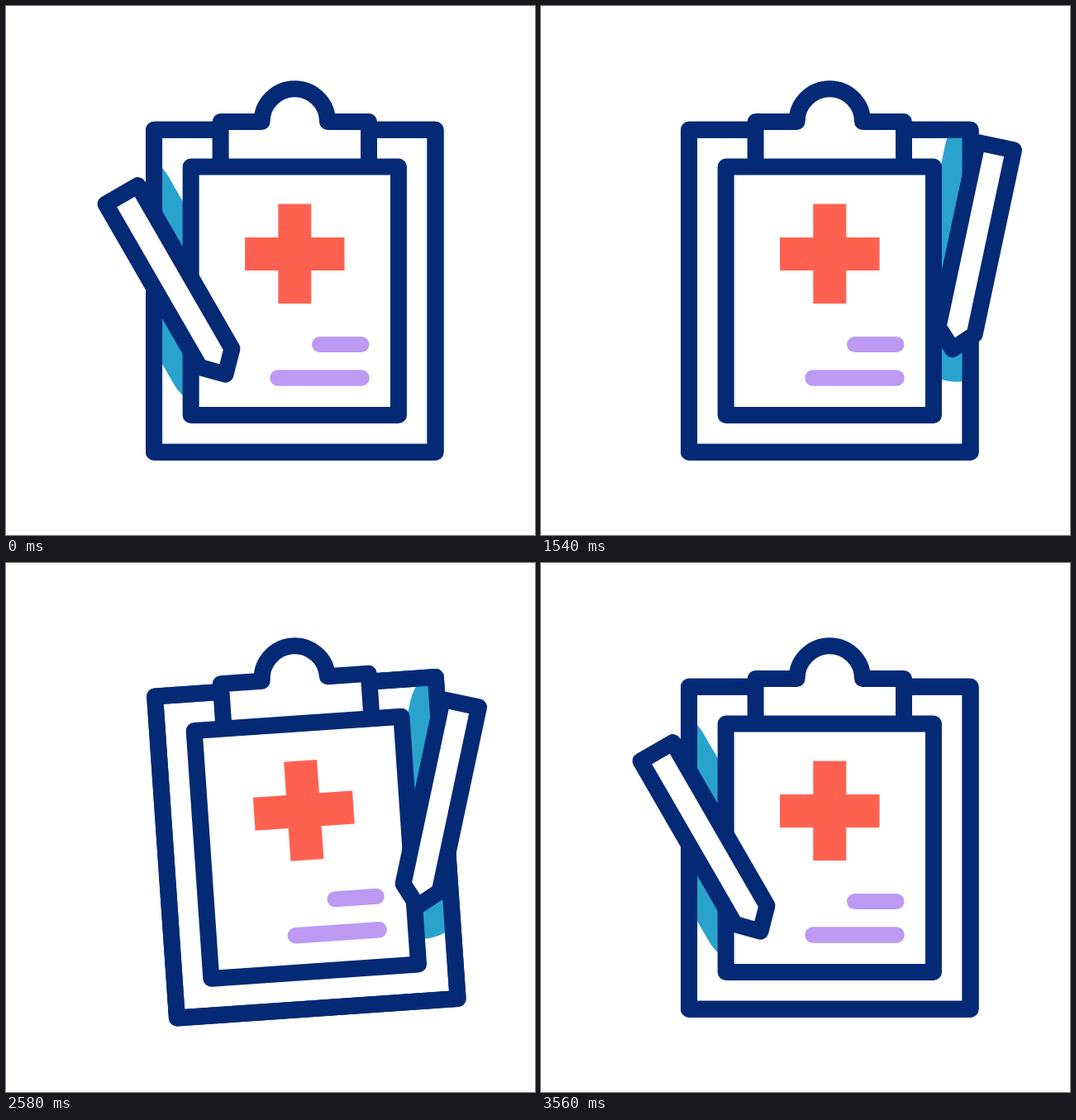
Animation, 640 px wide and 640 px high, one loop 3600 ms. Source, as an HTML page with a canvas:

```html
<!DOCTYPE html>
<html lang="en">
<head>
<meta charset="utf-8">
<title>Clipboard and pen</title>
<style>
  html, body { margin: 0; width: 100%; height: 100%; overflow: hidden; background: #fff; }
  canvas { display: block; width: 640px; height: 640px; }
</style>
</head>
<body>
<canvas id="stage" width="640" height="640"></canvas>
<script>
const ctx = document.getElementById('stage').getContext('2d');
const LOOP = 3600, LINE = 20, CX = 349.3, PIVOT_Y = 140;
const NAVY = '#042a76', RED = '#ff6151', PURPLE = '#bc9af4', CYAN = '#29a3cd', PLUM = '#bb3b86';

// Pen poses: middle of the blunt end and angle in degrees.
const REST = { x: 140, y: 228.3, deg: -30 };
const WRITE = { x: 428.5, y: 250.5, deg: 44.5 };
const LIFT = { x: 504.5, y: 218, deg: 46 };
const ASIDE = { x: 550, y: 169.7, deg: 12 };

const rad = deg => deg * Math.PI / 180;
const progress = (t, from, to) => Math.min(1, Math.max(0, (t - from) / (to - from)));
const ease = (t, from, to) => {
  const p = progress(t, from, to);
  return p * p * (3 - 2 * p);
};
const mix = (a, b, p) => ({
  x: a.x + (b.x - a.x) * p,
  y: a.y + (b.y - a.y) * p,
  deg: a.deg + (b.deg - a.deg) * p
});

function penPose(t) {
  if (t < 340) return mix(REST, WRITE, ease(t, 0, 340));
  if (t < 1060) return mix(WRITE, LIFT, ease(t, 340, 1060));
  if (t < 2000) return mix(LIFT, ASIDE, ease(t, 1060, 1520));
  return mix(ASIDE, REST, ease(t, 3080, 3540));
}

// Three swings that slow down slightly.
const boardTilt = t => 5 * Math.sin(6 * Math.PI * progress(t, 1570, 3540) ** 0.9);

// The top sheet falls with constant acceleration.
const sheetDrop = t => 0.00312 * Math.max(0, t - 2640) ** 2;

function shape(build) {
  const path = new Path2D();
  build(path);
  return path;
}

// A rectangle centred on the clipboard's axis.
const centred = (width, top, height) => shape(p => p.rect(CX - width / 2, top, width, height));

const board = centred(340.5, 149.7, 390);
const sheet = centred(251.3, 194.5, 300.5);
const cross = shape(p => {
  p.addPath(centred(40, 239.6, 120.4));
  p.addPath(centred(120.4, 280, 40));
});
const clamp = shape(p => {
  const half = 89.7, radius = 39.7, bottom = 194;
  p.moveTo(CX - half, bottom);
  p.lineTo(CX - half, PIVOT_Y);
  p.arc(CX, PIVOT_Y, radius, Math.PI, 0);
  p.lineTo(CX + half, PIVOT_Y);
  p.lineTo(CX + half, bottom);
});
const penBody = shape(p => {
  const half = 22.5, shoulder = 228, tip = 251;
  p.moveTo(-half, 0);
  p.lineTo(half, 0);
  p.lineTo(half, shoulder);
  p.lineTo(0, tip);
  p.lineTo(-half, shoulder);
  p.closePath();
});

function outlined(path) {
  ctx.fillStyle = '#fff';
  ctx.fill(path);
  ctx.strokeStyle = NAVY;
  ctx.lineWidth = LINE;
  ctx.stroke(path);
}

function line(x1, y1, x2, y2, width, color) {
  ctx.strokeStyle = color;
  ctx.lineWidth = width;
  ctx.beginPath();
  ctx.moveTo(x1, y1);
  ctx.lineTo(x2, y2);
  ctx.stroke();
}

function rotateBoard(deg) {
  ctx.translate(CX, PIVOT_Y);
  ctx.rotate(rad(deg));
  ctx.translate(-CX, -PIVOT_Y);
}

function placePen({ x, y, deg }) {
  ctx.translate(x, y);
  ctx.rotate(rad(deg));
}

// The pen's shadow shows only inside the given area.
function shadowOn(area, color, pen, tilt, drop) {
  ctx.save();
  ctx.clip(area);
  ctx.translate(0, -drop);
  rotateBoard(-tilt);
  placePen(pen);
  line(0, 10, 0, 230, 120, color);
  ctx.restore();
}

function drawSheet(pen, tilt, drop) {
  ctx.save();
  ctx.translate(0, drop);
  outlined(sheet);
  ctx.fillStyle = RED;
  ctx.fill(cross);
  shadowOn(cross, PLUM, pen, tilt, drop);
  line(379.5, 409.5, 430, 409.5, LINE - 1, PURPLE);
  line(329, 450, 430, 450, LINE - 0.5, PURPLE);
  ctx.restore();
}

function draw(t) {
  const pen = penPose(t), tilt = boardTilt(t), drop = sheetDrop(t);

  ctx.fillStyle = '#fff';
  ctx.fillRect(0, 0, 640, 640);
  ctx.lineJoin = ctx.lineCap = 'round';

  ctx.save();
  rotateBoard(tilt);
  outlined(board);
  shadowOn(board, CYAN, pen, tilt, 0);
  ctx.strokeStyle = NAVY;
  ctx.lineWidth = LINE;
  ctx.stroke(board);
  outlined(clamp);
  drawSheet(pen, tilt, 0);
  if (drop > 0) drawSheet(pen, tilt, drop);
  ctx.restore();

  ctx.save();
  placePen(pen);
  outlined(penBody);
  ctx.restore();
}

let start;
function tick(now) {
  start ??= now;
  draw((now - start) % LOOP);
  requestAnimationFrame(tick);
}
draw(0);
requestAnimationFrame(tick);
</script>
</body>
</html>
```
